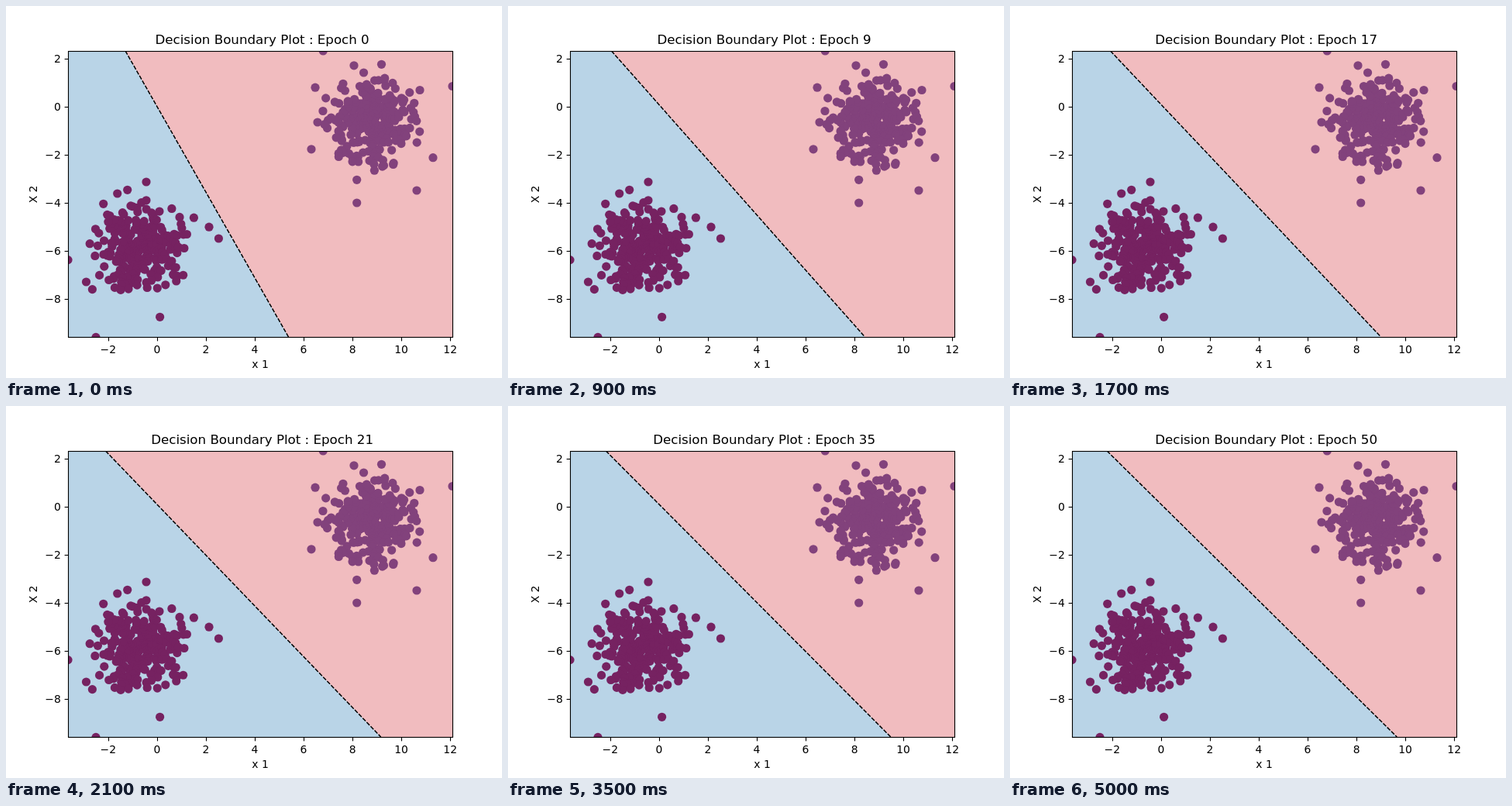
These frames come from a looping animation (640x480 px, 5100 ms). An HTML page with a canvas:

```html
<!DOCTYPE html>
<html lang="en">
<head>
<meta charset="utf-8">
<title>Decision Boundary Plot</title>
<style>
  html, body { margin: 0; width: 100%; height: 100%; overflow: hidden; background: #fff; }
  canvas { display: block; }
</style>
</head>
<body>
<canvas id="plot" width="640" height="480"></canvas>
<script>
const ctx = document.getElementById('plot').getContext('2d');
const LEFT = 80, RIGHT = 576, TOP = 58, BOTTOM = 427;
const UNIT_X = 31.53, UNIT_Y = 31;
const STEP = 100, EPOCHS = 51;

let seed = 20011;
const random = () => (seed = seed * 16807 % 2147483647) / 2147483647;

// Normal cloud with unit deviation, cut off at `limit`; strata in radius and
// a turning angle keep the middle evenly filled.
function cloud(count, cx, cy, limit = 2.1) {
  const reach = 1 - Math.exp(-limit * limit / 2);
  return Array.from({ length: count }, (_, i) => {
    const r = Math.sqrt(-2 * Math.log(1 - reach * (i + random()) / count));
    const a = i * 2.4 + random() * 1.5;
    return [cx + UNIT_X * r * Math.cos(a), cy + UNIT_Y * r * Math.sin(a)];
  });
}

// Each cluster is a random cloud plus its few far outliers.
const clusters = [
  {
    color: '#762261',
    points: [
      ...cloud(235, 174, 312),
      [181, 227], [156.7, 237.3], [143.7, 242], [125.7, 255.3], [242.4, 273.2], [262, 285.2],
      [274.4, 300], [80, 327.6], [103.5, 356], [111.4, 365.6], [198.6, 401.3], [116, 427.4]
    ]
  },
  {
    color: '#82427c',
    points: [
      ...cloud(235, 471, 149),
      [409.2, 58], [449, 76.8], [484.5, 75.3], [534, 108.5], [576, 103.5], [399, 105.2],
      [394, 184.8], [402, 150], [452.7, 254], [530, 238], [551, 195.7], [452.7, 224.3]
    ]
  }
];

// The boundary turns quickly at first, then settles.
function boundary(epoch) {
  const low = 516.3 - 151.8 / (1 + (epoch / 4.9) ** 0.89);
  return { low, high: 154 - 0.214 * (low - 364.5) };
}

function line(x0, y0, x1, y1) {
  ctx.beginPath();
  ctx.moveTo(x0, y0);
  ctx.lineTo(x1, y1);
  ctx.stroke();
}

function text(label, x, y, align = 'center', size = 13.89) {
  ctx.font = `${size}px "DejaVu Sans", sans-serif`;
  ctx.textAlign = align;
  ctx.fillText(label, x, y);
}

const signed = v => String(v).replace('-', '\u2212');

function drawField(epoch) {
  const { low, high } = boundary(epoch);
  ctx.save();
  ctx.beginPath();
  ctx.rect(LEFT, TOP, RIGHT - LEFT, BOTTOM - TOP);
  ctx.clip();
  ctx.fillStyle = '#b9d4e7';
  ctx.fillRect(LEFT, TOP, RIGHT - LEFT, BOTTOM - TOP);
  ctx.fillStyle = '#f1bcbf';
  ctx.beginPath();
  ctx.moveTo(high, TOP);
  ctx.lineTo(RIGHT, TOP);
  ctx.lineTo(RIGHT, BOTTOM);
  ctx.lineTo(low, BOTTOM);
  ctx.fill();
  for (const { color, points } of clusters) {
    ctx.fillStyle = color;
    for (const [x, y] of points) {
      ctx.beginPath();
      ctx.arc(x, y, 5.6, 0, 2 * Math.PI);
      ctx.fill();
    }
  }
  ctx.strokeStyle = '#000';
  ctx.lineWidth = 1.5;
  ctx.setLineDash([5.4, 1.96]);
  line(high, TOP, low, BOTTOM);
  ctx.restore();
}

function drawAxes() {
  ctx.fillStyle = ctx.strokeStyle = '#000';
  ctx.lineWidth = 1.11;
  ctx.strokeRect(LEFT + 0.5, TOP + 0.5, RIGHT - LEFT, BOTTOM - TOP);
  for (let v = -2; v <= 12; v += 2) {
    const x = 194.8 + v * UNIT_X, px = Math.round(x) + 0.5;
    line(px, 428, px, 432.4);
    text(signed(v), x, 448);
  }
  for (let v = 2; v >= -8; v -= 2) {
    const y = Math.round(129.8 - v * UNIT_Y);
    line(75.6, y + 0.5, LEFT, y + 0.5);
    text(signed(v), 70.8, y + 5, 'right');
  }
  text('x 1', 328, 467);
  ctx.save();
  ctx.translate(40, 243);
  ctx.rotate(-Math.PI / 2);
  text('X 2', 0, 0);
  ctx.restore();
}

let shown = -1;
function frame() {
  const epoch = Math.floor(performance.now() / STEP) % EPOCHS;
  if (epoch !== shown) {
    shown = epoch;
    ctx.fillStyle = '#fff';
    ctx.fillRect(0, 0, 640, 480);
    drawField(epoch);
    drawAxes();
    text(`Decision Boundary Plot : Epoch ${epoch}`, 330.6, 49, 'center', 16.67);
  }
  requestAnimationFrame(frame);
}
frame();
</script>
</body>
</html>
```
